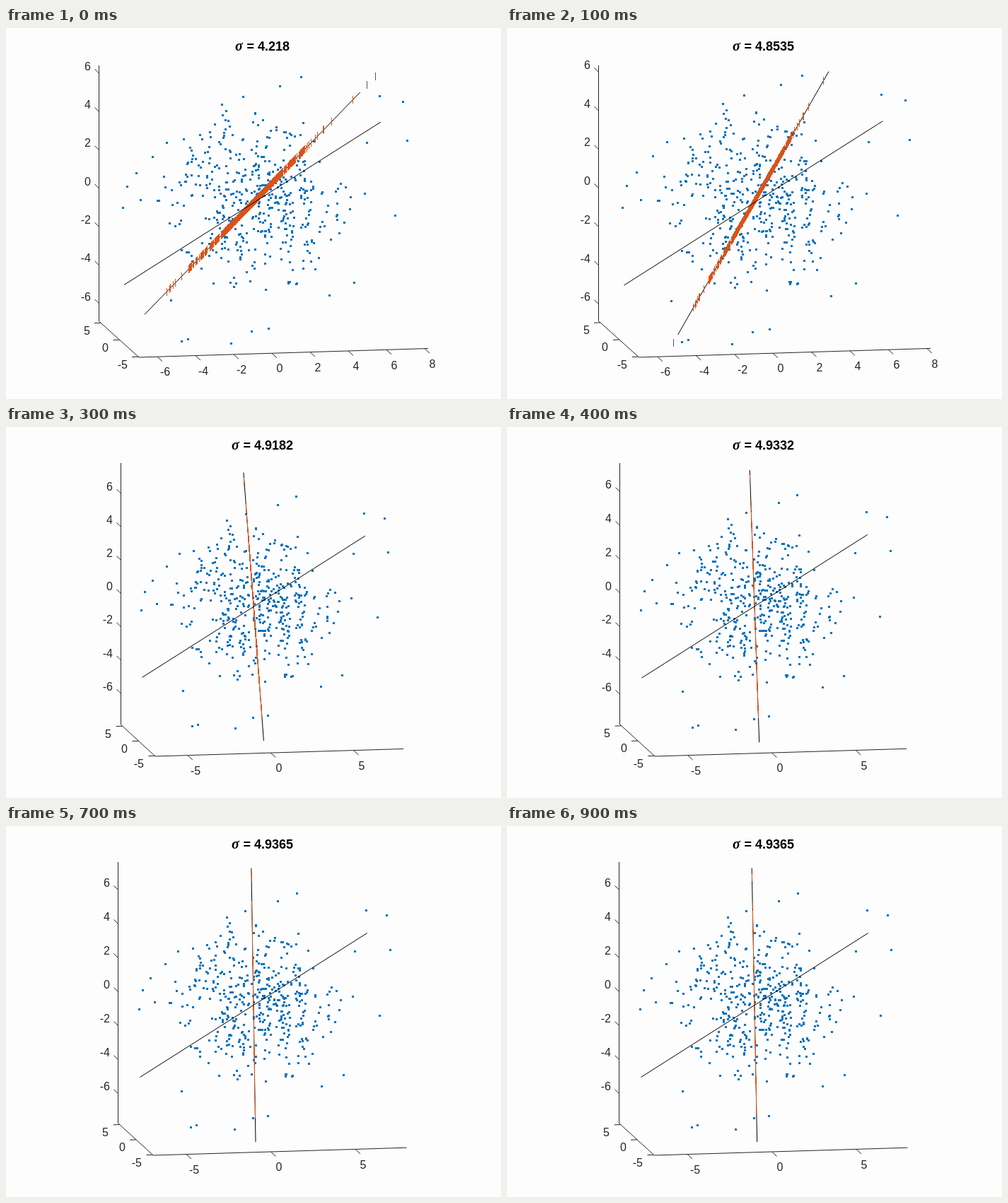
Write an HTML page with a canvas that moves like this. It is 700 px wide and 525 px high and loops after 1000 ms.

```html
<!DOCTYPE html>
<html lang="en">
<head>
<meta charset="utf-8">
<title>Principal axis search</title>
<style>
  html, body { margin: 0; width: 100%; height: 100%; overflow: hidden; background: #fdfdfd; }
  canvas { display: block; }
</style>
</head>
<body>
<canvas id="plot" width="700" height="525"></canvas>
<script>
const ctx = document.getElementById('plot').getContext('2d');
const LOOP = 1000, REACH = 219;
const PAPER = '#fdfdfd', INK = '#262626', BLUE = '#0072bd', ORANGE = '#d95319', GREY = '#5c5350';
const SANS = '"Liberation Sans", Arial, sans-serif';

// Steps of the search: start in ms, zoom, tilt of the axis from vertical in degrees,
// foreshortening of the axis, and projections that fall beyond its ends
const steps = [
  { at: 0, zoom: 1, tilt: 44.1, sigma: '4.218', beyond: [1.065, 1.144] },
  { at: 100, zoom: 1.008, tilt: 29.8, sigma: '4.8535', depth: .972, beyond: [-1.06] },
  { at: 200, zoom: .8635, tilt: 2.04, sigma: '4.8796' },
  { at: 300, zoom: .869, tilt: -4.3, sigma: '4.9182' },
  { at: 400, zoom: .88, tilt: -2, sigma: '4.9332' },
  { at: 500, zoom: .8855, tilt: -.74, sigma: '4.9364' },
  { at: 700, zoom: .885, tilt: -.9, sigma: '4.9365' },
  { at: 800, zoom: .885, tilt: -1, sigma: '4.9365' },
  { at: 900, zoom: .885, tilt: -1.1, sigma: '4.9365' }
];

// Points that give the cloud its outline
const outline = [
  [417, 69], [387, 82], [335, 97], [305, 108], [528, 96], [561, 104], [567, 159], [510, 162],
  [550, 265], [507, 234], [492, 360], [457, 378], [371, 425], [347, 429], [318, 446], [257, 440],
  [248, 443], [233, 385], [165, 254], [171, 224], [184, 205], [207, 182], [227, 162], [190, 243]
];

function seeded(seed) {
  return () => {
    seed = (seed + 0x6d2b79f5) | 0;
    let t = Math.imul(seed ^ (seed >>> 15), 1 | seed);
    t = (t + Math.imul(t ^ (t >>> 7), 61 | t)) ^ t;
    return ((t ^ (t >>> 14)) >>> 0) / 4294967296;
  };
}

const rand = seeded(17);
const normal = () => Math.sqrt(-2 * Math.log(1 - rand())) * Math.cos(2 * Math.PI * rand());

function makeCloud(count) {
  const pts = [...outline];
  while (pts.length < count) {
    const u = normal(), v = normal();
    if (Math.hypot(u, v) < 2.1) pts.push([350 + 66 * u, 243 + 63 * v]);
  }
  return pts;
}

const cloud = makeCloud(470);
const marks = Array.from({ length: 430 }, () => .3 * normal()).filter(t => Math.abs(t) < .98);

function line(...pts) {
  ctx.beginPath();
  for (const [x, y] of pts) ctx.lineTo(x, y);
  ctx.stroke();
}

function label(text, x, y, align) {
  ctx.textAlign = align;
  ctx.fillText(text, Math.round(x), Math.round(y + 5.6));
}

const between = ([x0, y0], [x1, y1], f) => [x0 + (x1 - x0) * f, y0 + (y1 - y0) * f];

function drawAxes(zoom) {
  const d = 1 - zoom, wide = zoom > .95;
  const left = Math.round(131 + d * 237) + .5;
  const top = [left, wide ? 53 : 51], corner = [left, 415 + d * 48];
  const front = [188 + d * 176, 466], end = [597 - d * 265, 453.5 + d * 15];
  ctx.strokeStyle = ctx.fillStyle = INK;
  ctx.font = '16px ' + SANS;
  line(top, corner, front, end);

  for (let v = -6; v <= 6; v += 2) {
    const y = 217 + d * 66 - v * 27.15 * zoom;
    line([left, y + 10], [left - 6, y + 4]);
    label(v, left - 12, y, 'right');
  }
  for (let v = -5; v <= 5; v += 5) {
    const [x, y] = between(corner, front, .515 - v * .094);
    line([x, y], [x - 9, y + .3]);
    label(v, x - 15.5, y + 10.8, 'right');
  }
  const step = wide ? 2 : 5;
  for (let v = wide ? -6 : -5; v <= 8; v += step) {
    const x = 376 - d * 13 + v * 27 * zoom;
    const y = between(front, end, (x - front[0]) / (end[0] - front[0]))[1];
    line([x, y], [x + 7, y + 6.5]);
    label(v, x + 11.3, y + 21.6, 'center');
  }
}

function drawTitle(sigma) {
  const rest = ' = ' + sigma, greek = 11.5;
  ctx.fillStyle = '#000';
  ctx.textAlign = 'left';
  ctx.font = 'bold 18px ' + SANS;
  const x = Math.round(362.5 - (greek + ctx.measureText(rest).width) / 2);
  ctx.fillText(rest, x + greek, 32);
  ctx.font = 'italic bold 20px "Liberation Serif", serif';
  ctx.fillText('σ', x, 32);
}

function draw({ zoom, tilt, sigma, depth = 1, beyond = [] }) {
  const place = ([x, y]) => [362 + (x - 362) * zoom, 294 + (y - 294) * zoom];
  const [cx, cy] = place([348.4, 248.2]);
  const angle = tilt * Math.PI / 180, reach = REACH * zoom * depth;
  const along = t => [cx + t * reach * Math.sin(angle), cy - t * reach * Math.cos(angle)];
  const mark = t => {
    const [x, y] = along(t);
    ctx.fillRect(Math.round(x - .5), Math.round(y - 5.5), 1, 11);
  };

  ctx.fillStyle = PAPER;
  ctx.fillRect(0, 0, 700, 525);
  drawAxes(zoom);
  drawTitle(sigma);

  ctx.fillStyle = BLUE;
  for (const [x, y] of cloud.map(place)) ctx.fillRect(Math.round(x - 1), Math.round(y - 1), 3, 3);

  ctx.strokeStyle = '#000';
  line(along(-1), along(1));
  ctx.fillStyle = ORANGE;
  marks.forEach(mark);
  ctx.fillStyle = GREY;
  beyond.forEach(mark);
  line(place([167, 363.5]), place([530, 133]));
}

const start = performance.now();
let shown;

function tick(now) {
  const t = Math.max(0, now - start) % LOOP;
  const step = steps.findLast(s => s.at <= t);
  if (step !== shown) draw(shown = step);
  requestAnimationFrame(tick);
}
tick(start);
</script>
</body>
</html>
```
